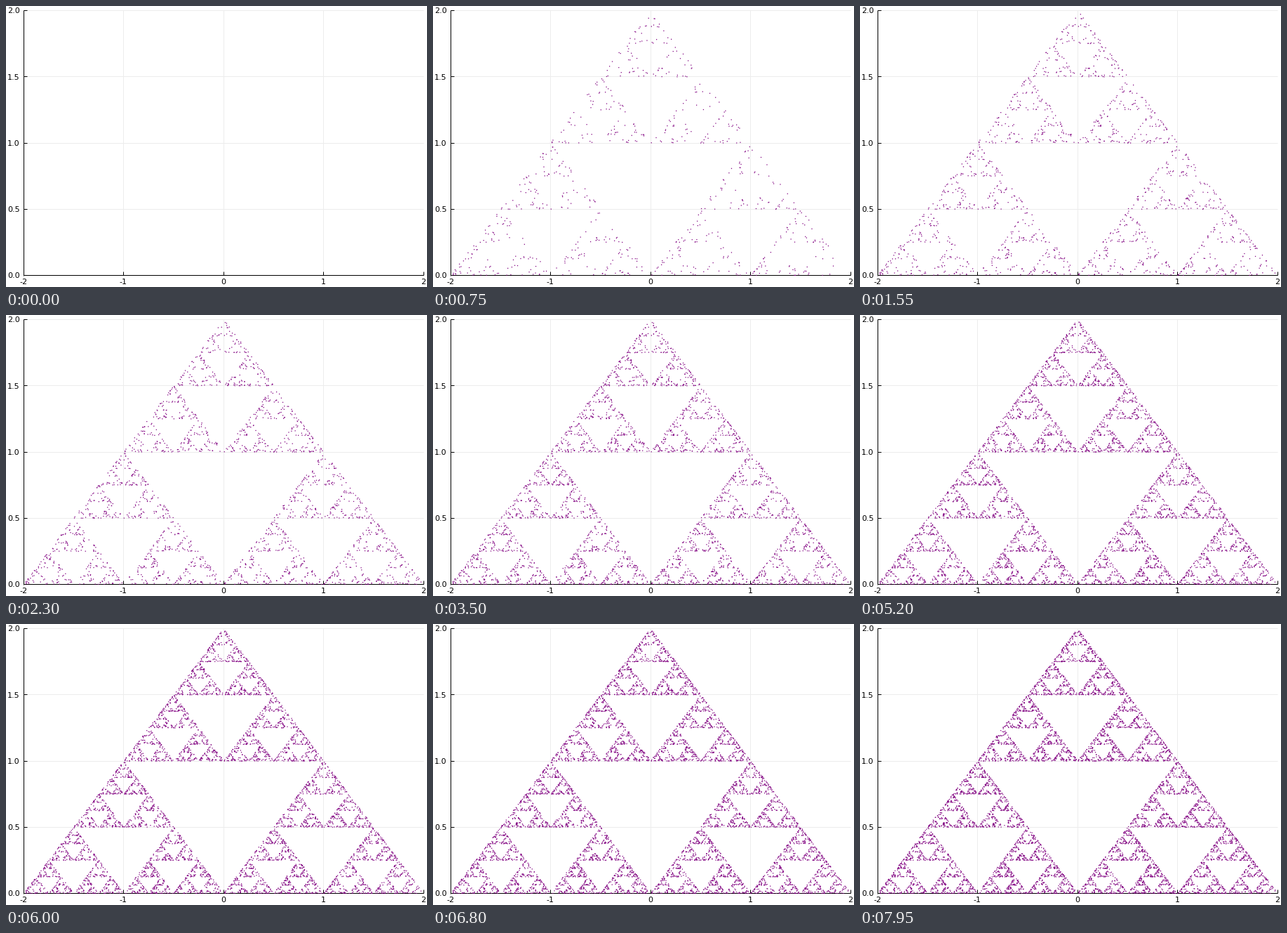
Recreate the animation shown at these times as a matplotlib script. Size 600 by 400 pixels, loop 8 s.

```python
import random

import matplotlib.pyplot as plt
import numpy as np
from matplotlib.animation import FuncAnimation
from matplotlib.colors import to_rgb

W, H, DPI = 600, 400, 100
FRAMES, INTERVAL, PER_FRAME = 160, 50, 50
LEFT, RIGHT, TOP, BOTTOM = 25, 595, 6, 383
PURPLE, GRID = "#800080", "#ececec"
DOT = 1.25  # dot size in pixels
CORNERS = [(-2, 0), (2, 0), (0, 2)]


def px(x):
    return 24.9 + (x + 2) * 142.5


def py(y):
    return 383.02 - y * 188.5


def chaos_game(count):
    """Jump halfway to a random corner, again and again."""
    rng = random.Random(11)
    x, y = 0.0, 0.0
    points = []
    for _ in range(count):
        cx, cy = rng.choice(CORNERS)
        x, y = (x + cx) / 2, (y + cy) / 2
        points.append((x, y))
    return np.array(points)


def overlap(center, cell):
    """Share of each one-pixel cell that a dot covers along one axis."""
    lo = np.maximum(center - DOT / 2, cell)
    hi = np.minimum(center + DOT / 2, cell + 1)
    return np.clip(hi - lo, 0, 1)


plt.rcParams["font.family"] = "DejaVu Sans"
fig = plt.figure(figsize=(W / DPI, H / DPI), dpi=DPI, facecolor="white")
ax = fig.add_axes([0, 0, 1, 1])
ax.axis("off")


def line(xs, ys, color, z):
    ax.plot(xs, ys, color=color, lw=0.72, zorder=z,
            solid_capstyle="butt", snap=True)


def label(x, y, text, ha):
    ax.text(x, y, text, fontsize=8, color="black", ha=ha, va="baseline")


for v in (-2, -1, 0, 1, 2):
    x = px(v)
    if abs(v) < 2:
        line([x, x], [TOP, BOTTOM], GRID, 1)
    line([x, x], [BOTTOM - 5, BOTTOM], "black", 2)
    label(x, 396, str(v), "center")

for v in (0, 0.5, 1, 1.5, 2):
    y = py(v)
    if v > 0:
        line([LEFT, RIGHT], [y, y], GRID, 1)
    line([LEFT, LEFT + 5], [y, y], "black", 2)
    label(19.75, py(v) + 4.3, f"{v:.1f}", "right")

line([LEFT, LEFT], [TOP, BOTTOM + 1], "black", 2)
line([LEFT, RIGHT], [BOTTOM, BOTTOM], "black", 2)

cloud = chaos_game(FRAMES * PER_FRAME)
cloud_x, cloud_y = px(cloud[:, 0]) + 0.5, py(cloud[:, 1]) + 0.5
cols, rows = cloud_x.astype(int), cloud_y.astype(int)

layer = np.zeros((H, W, 4))
layer[..., :3] = to_rgb(PURPLE)
dots = ax.imshow(layer, extent=(0, W, H, 0), aspect="auto",
                 interpolation="nearest", zorder=3)
ax.set_xlim(0, W)
ax.set_ylim(H, 0)


def update(i):
    n = i * PER_FRAME
    clear = np.ones((H, W))
    for dy in (-1, 0, 1):
        for dx in (-1, 0, 1):
            r, c = rows[:n] + dy, cols[:n] + dx
            cover = overlap(cloud_x[:n], c) * overlap(cloud_y[:n], r)
            np.multiply.at(clear, (r, c), 1 - cover)
    clear[BOTTOM + 1:] = 1
    layer[..., 3] = 1 - clear
    dots.set_data(layer)
    return (dots,)


def reset():
    return update(0)


anim = FuncAnimation(fig, update, frames=FRAMES, init_func=reset,
                     interval=INTERVAL, repeat=True, repeat_delay=0)
plt.show()
```
